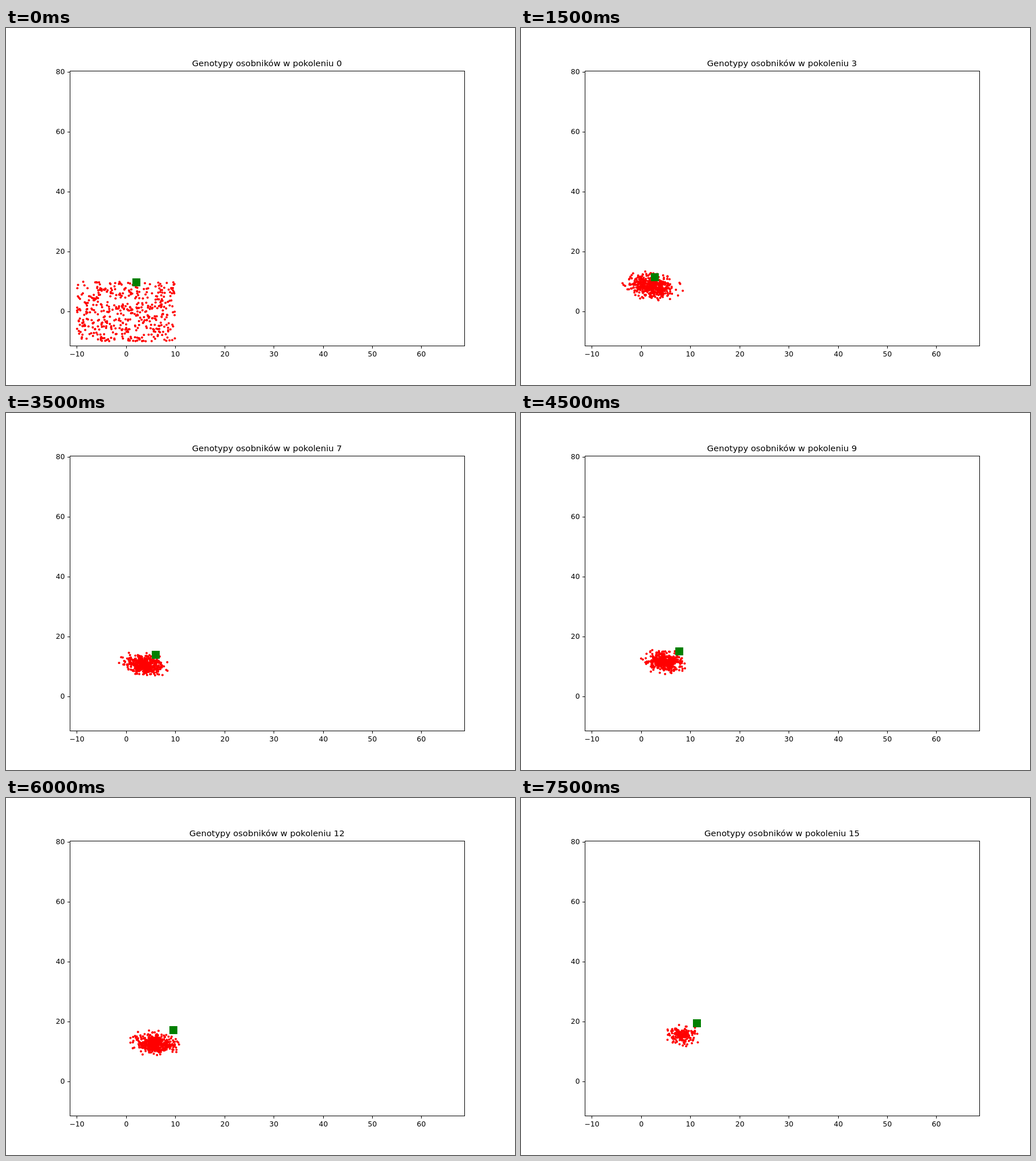
Write an HTML page with a canvas that moves like this. It is 894 px wide and 626 px high and loops after 8 s.

```html
<!DOCTYPE html>
<html lang="pl">
<head>
<meta charset="utf-8">
<style>
html, body { margin: 0; width: 100%; height: 100%; overflow: hidden; background: #fff; }
canvas { display: block; }
</style>
</head>
<body>
<canvas id="stage" width="894" height="626"></canvas>
<script>
const ctx = document.getElementById('stage').getContext('2d');
const STEP = 500, COUNT = 16;
const LEFT = 112.5, RIGHT = 805.5, TOP = 75.5, BOTTOM = 557.5;
const toX = v => 210.8 + 8.643 * v;
const toY = v => 497 - 5.25 * v;
const snap = v => Math.round(v) + 0.5;

// Key generations: optimum (ox, oy), crowd centre (cx, cy), its spread and size
const keys = [
  { gen: 0, ox: 228.3, oy: 445.7, cx: 224, cy: 457, spread: 19, size: 460 },
  { gen: 3, ox: 234.4, oy: 436.4, cx: 229, cy: 453, spread: 19, size: 490 },
  { gen: 10, ox: 284.6, oy: 414.3, cx: 255, cy: 434, spread: 13, size: 420 },
  { gen: 13, ox: 298, oy: 403, cx: 264, cy: 429, spread: 16.5, size: 490 },
  { gen: 15, ox: 308.6, oy: 394.8, cx: 283, cy: 417, spread: 12, size: 170 }
];

function stateAt(gen) {
  const i = Math.max(1, keys.findIndex(k => k.gen >= gen));
  const a = keys[i - 1], b = keys[i];
  const t = (gen - a.gen) / (b.gen - a.gen);
  const state = {};
  for (const name in a) state[name] = a[name] + (b[name] - a[name]) * t;
  return state;
}

function seeded(seed) {
  let s = seed * 7919 + 12345;
  return () => {
    s = (s + 0x6D2B79F5) | 0;
    let t = Math.imul(s ^ (s >>> 15), 1 | s);
    t = (t + Math.imul(t ^ (t >>> 7), 61 | t)) ^ t;
    return ((t ^ (t >>> 14)) >>> 0) / 4294967296;
  };
}

function dot(x, y) {
  ctx.beginPath();
  ctx.arc(x, y, 2, 0, 2 * Math.PI);
  ctx.fill();
}

// The first generation is uniform, later ones are normally distributed
function drawCrowd({ gen, cx, cy, spread, size }) {
  const rand = seeded(gen + 1);
  ctx.fillStyle = '#f00';
  for (let i = 0; i < size; i++) {
    const u = rand(), v = rand();
    if (gen === 0) {
      dot(toX(20 * u - 10), toY(20 * v - 10));
    } else {
      const r = Math.sqrt(-2 * Math.log(0.012 + 0.988 * u));
      const dx = spread * r * Math.cos(2 * Math.PI * v);
      const dy = (4 + 0.27 * spread) * r * Math.sin(2 * Math.PI * v);
      dot(cx + dx, cy + dy + 0.08 * dx);
    }
  }
}

function drawOptimum({ ox, oy }) {
  ctx.fillStyle = '#008000';
  ctx.fillRect(Math.round(ox - 6.75), Math.round(oy - 6.75), 14, 14);
}

function line(x0, y0, x1, y1) {
  ctx.beginPath();
  ctx.moveTo(x0, y0);
  ctx.lineTo(x1, y1);
  ctx.stroke();
}

function text(str, x, y, size, align) {
  ctx.font = size + 'px "DejaVu Sans", sans-serif';
  ctx.textAlign = align;
  ctx.fillText(str, x, y);
}

function drawAxes(gen) {
  ctx.fillStyle = ctx.strokeStyle = '#000';
  ctx.lineWidth = 1;
  ctx.strokeRect(LEFT, TOP, RIGHT - LEFT, BOTTOM - TOP);
  for (let v = -10; v <= 60; v += 10) {
    const x = snap(toX(v));
    line(x, BOTTOM, x, BOTTOM + 4.5);
    text(String(v).replace('-', '\u2212'), x, 576, 12.42, 'center');
  }
  for (let v = 0; v <= 80; v += 20) {
    const y = snap(toY(v));
    line(LEFT - 4.5, y, LEFT, y);
    text(v, 103.4, y + 3.5, 12.42, 'right');
  }
  text('Genotypy osobników w pokoleniu ' + gen, 458.4, 67, 14.9, 'center');
}

let shown = -1;
const start = performance.now();
function tick() {
  const gen = Math.floor((performance.now() - start) / STEP) % COUNT;
  if (gen !== shown) {
    shown = gen;
    const state = stateAt(gen);
    ctx.fillStyle = '#fff';
    ctx.fillRect(0, 0, 894, 626);
    drawCrowd(state);
    drawOptimum(state);
    drawAxes(gen);
  }
  requestAnimationFrame(tick);
}
tick();
</script>
</body>
</html>
```
